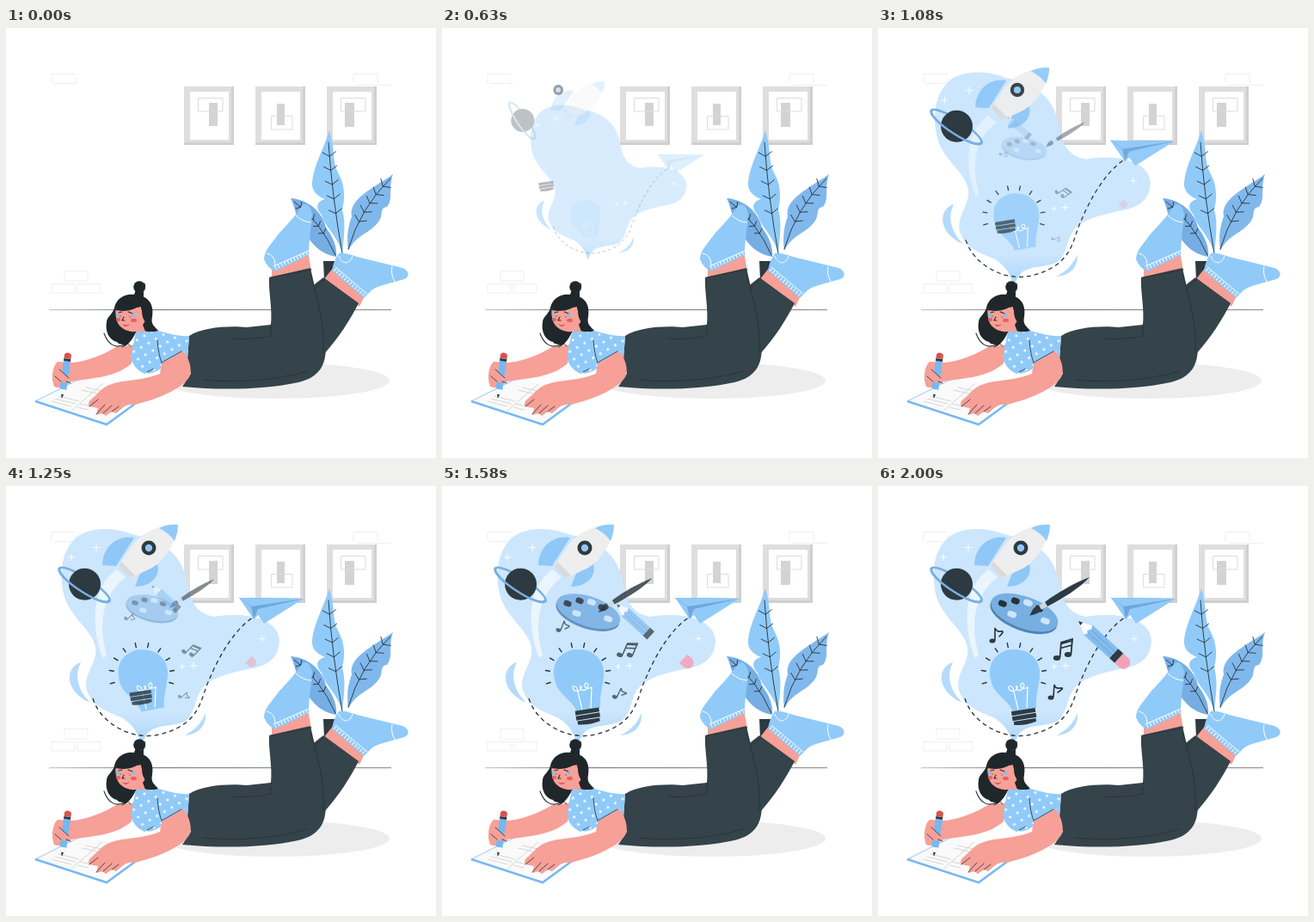
Animation, 500 px wide and 500 px high, one loop 2.04 s. Source, as an HTML page:

```html
<!DOCTYPE html>
<html lang="en">
<head>
<meta charset="utf-8">
<title>Daydreaming</title>
<style>
html, body { margin: 0; width: 100%; height: 100%; overflow: hidden; background: #fff; }
svg { display: block; width: 100vw; height: 100vh; }
.line { fill: none; stroke: #263238; stroke-linecap: round; }
.white { fill: none; stroke: #fff; }
.skin { fill: #f6a097; }
.blue { fill: #90caf9; }
.dark { fill: #2d3a41; }
.pants { fill: #35434a; }
.hair { fill: #20272b; }
</style>
</head>
<body>
<svg viewBox="0 0 500 500">
<defs>
  <pattern id="dots" width="14" height="14" patternUnits="userSpaceOnUse" patternTransform="rotate(15)">
    <path class="blue" d="M0 0H14V14H0z"/>
    <circle cx="3" cy="3" r="1.500" fill="#fff"/><circle cx="10" cy="10" r="1.500" fill="#fff"/>
  </pattern>
  <linearGradient id="air" x1="0" y1="0" x2="0" y2="1">
    <stop offset=".85" stop-color="#cce6fd"/><stop offset="1" stop-color="#aad6fa"/>
  </linearGradient>
  <linearGradient id="floor">
    <stop stop-color="#ccc"/><stop offset=".3" stop-color="#7f8588"/><stop offset="1" stop-color="#999"/>
  </linearGradient>
  <g id="frame">
    <path fill="#dedede" d="M0 0H58V68H0z"/>
    <path fill="#cfcfcf" d="M55 0H58V68H0V65H55z"/>
    <path fill="#fff" d="M7 6H52V62H7z"/>
  </g>
</defs>

<!-- wall and floor -->
<path fill="none" stroke="#efefef" d="M53 64V53.500H81M56 64.500H81V58M404 64V53.500H432V64M407 66.500H448M68 282.500H95V294H68zM53 297.500H80V308H53zM83 297.500H110V308H83z"/>
<path d="M50 327H448V328.200H50z" fill="url(#floor)"/>
<use href="#frame" x="207" y="68"/><use href="#frame" x="290" y="68"/><use href="#frame" x="373" y="68"/>
<path fill="#d3d3d3" d="M236 87H246V114H236zM315 88H324V113H315zM394 87H405V115H394z"/>
<path fill="none" stroke="#dcdcdc" d="M223.500 81.500H252V97H223.500zM308.500 102.500H333V118H308.500zM389.500 81.500H418V97H389.500z"/>
<ellipse cx="313" cy="410" rx="133" ry="21" fill="#ededed"/>

<!-- daydream -->
<g id="cloud">
  <path fill="url(#air)" d="M157 301C154 288 149 279 136 270C118 262 102 258 95 240C87 222 107 206 104 188C101 168 76 154 68 129C60 100 66 72 84 58C104 46 130 49 150 57C182 62 203 80 209 106C213 129 218 148 242 152C270 147 316 150 318 180C317 203 301 210 281 213C259 218 242 222 231 232C218 246 222 262 209 273C194 281 171 276 163 290z"/>
  <path fill="#b5dafb" d="M87 205C68 211 68 239 98 252C84 238 79 221 87 205zM232 264C233 281 222 289 207 290C220 284 227 276 232 264z"/>
  <path class="white" d="M76 79v8m-4-4h8M105 67v9m-4.500-4.500h9M218 205v8m-4-4h8M298 174v7m-3.500-3.500h7M205 207v6m-3-3h6"/>
</g>
<path id="trail" fill="#fff" opacity="0" d="M129 97C104 113 95 155 113 201L117 196C107 160 112 127 139 106z"/>
<path id="route" class="line" stroke-width="1.300" stroke-dasharray="5 4" style="stroke-linecap:butt" d="M101 247C111 279 150 296 178 289C228 277 226 246 236 226C247 199 266 165 290 151"/>
<g id="plane">
  <path class="blue" d="M271 130L346 131L300 160L293 150L288 155z"/>
  <path fill="#6fa6dc" d="M271 130L346 131L293 143L288 155L285 140z"/>
  <path class="blue" d="M271 130L346 131L286 140z"/>
</g>
<g id="rocket">
  <path fill="#8fc7f7" d="M112 92C113 71 128 57 149 60L128 93zM176 91C180 104 169 117 150 117L157 99z"/>
  <path fill="#eee" d="M200 45C177 45 159 54 148 67L131 92L145 107L170 95C186 85 197 68 200 45z"/>
  <path fill="#dadada" d="M134 88L131 93L144 107L150 104z"/>
  <path class="blue" d="M200 45Q188 44 178 49Q190 55 196 64Q200 54 200 45z"/>
</g>
<g id="porthole">
  <circle class="dark" cx="166" cy="72" r="8.500"/><circle cx="166" cy="72" r="4.200" fill="#8fc7f7"/>
</g>
<g id="planet">
  <g fill="none" stroke="#78afe1" stroke-width="2.500" transform="rotate(33 91 115)">
    <ellipse cx="91" cy="115" rx="35" ry="8"/>
    <circle class="dark" cx="91" cy="114" r="18.500" stroke="none"/>
    <path d="M57 113C52 126 130 127 125 113"/>
  </g>
</g>
<g id="bulb">
  <path class="blue" d="M131 225C126 203 141 190 158 190C179 190 190 205 188 222C186 238 183 246 184 258L157 263C152 248 134 243 131 225z"/>
  <path class="white" stroke-width="1.200" d="M163 260L157 235C150 227 150 241 159 238C166 235 158 228 162 237C167 240 173 231 168 229C163 231 167 238 174 234L173 258"/>
</g>
<path id="rays" class="line" stroke-width="1.400"/>
<g id="socket">
  <path class="dark" transform="rotate(-9 170 268)" d="M156 260H184V265H156zM156 266H184V271H156zM157 272H183V276Q170 279 157 276z"/>
</g>
<g id="palette">
  <g transform="rotate(20 170 148)">
    <ellipse cx="170" cy="150" rx="41" ry="18.500" fill="#4e84b9"/>
    <ellipse cx="170" cy="147" rx="41" ry="18.500" fill="#78afe1"/>
    <path class="line" stroke-width="7" d="M141 146h3M154 138h3M183 137h3"/>
    <path class="line" stroke-width="7" style="stroke:#cce6fd" d="M168 135h4M194 148h4M155 154h4"/>
  </g>
</g>
<g id="brush">
  <path class="dark" d="M194 135C210 123 228 113 246 106C234 119 216 130 197 140z"/>
  <path fill="#cfd8dc" d="M187 139L194 135L197 140L190 144z"/>
  <path class="dark" d="M187 139L190 144C186 150 180 149 176 151C179 147 179 141 187 139z"/>
</g>
<g id="pencil">
  <g transform="translate(233 157) rotate(42.500)">
    <path fill="#fff" d="M0 0L17-7.500V7.500z"/><path class="dark" d="M0 0L5-2.200V2.200z"/>
    <path fill="#82bcef" d="M15-7.500H56V7.500H15L18 4L15 1L18-3z"/>
    <path class="line" style="stroke:#5c96cc" stroke-width=".7" d="M18-2.500H56M18 2.500H56"/>
    <path class="dark" d="M56-7.500H64V7.500H56z"/>
  </g>
</g>
<g id="eraser">
  <path fill="#f4a0b8" transform="translate(233 157) rotate(42.500)" d="M64-7.500H72Q79-6 79 0T72 7.500H64z"/>
</g>
<g id="noteA">
  <ellipse class="dark" cx="133" cy="180" rx="3.500" ry="2.600"/>
  <path class="line" stroke-width="1.600" d="M136 179V165Q138 170 143 169T141 175"/>
</g>
<g id="noteB">
  <ellipse class="dark" cx="208" cy="200" rx="4.200" ry="3"/><ellipse class="dark" cx="221" cy="196" rx="4.200" ry="3"/>
  <path class="line" stroke-width="1.800" d="M211.500 199L213 182L226 178L224.500 195M213 183.500L226 180M212.500 188.500L225.500 185"/>
</g>
<g id="noteC">
  <ellipse class="dark" cx="201" cy="246" rx="3.500" ry="2.600"/>
  <path class="line" stroke-width="1.600" d="M204 245L205 231Q206 236 212 235T209 240"/>
</g>

<!-- plant -->
<path fill="#76aee3" d="M331 198C350 199 368 213 372 232C381 244 385 255 384 266C364 263 351 247 346 232C336 221 337 209 331 198z"/>
<path fill="#80b8ec" d="M450 170C444 187 451 198 443 208C434 209 439 217 434 224C424 239 407 240 398 259C396 239 398 231 402 219C398 199 426 187 450 170z"/>
<path class="blue" d="M376 119C383 140 379 156 386 168C395 184 394 199 391 211C396 229 392 248 391 263C386 241 370 231 367 217C360 210 360 202 371 199C361 195 355 189 356 179C358 159 369 142 376 119z"/>
<path id="veins" class="line" stroke-width=".9"/>

<!-- legs -->
<path class="dark" d="M369 271H384L381 283L370 293z"/>
<path class="skin" d="M381 278L418 309L411 324L369 293z"/>
<path class="blue" d="M387 262C396 261 403 265 412 267L461 279C469 282 470 289 463 292C446 297 431 300 425 305L416 314L379 282Q381 270 387 262z"/>
<path class="white" d="M387 265C390 275 400 276 403 265M383 278L420 309M449 277Q447 286 452 295"/>
<path class="white" stroke-width="4" stroke-dasharray="1 3" d="M382 281L417 311"/>
<path class="pants" d="M350 305L369 290L410 320C399 341 389 357 370 379z"/>
<path class="skin" d="M309 278L351 260L355 282L309 291z"/>
<path class="blue" d="M313 283L352 264C352 247 355 233 356 217C355 208 350 203 345 206C335 220 326 230 318 238C310 250 300 258 300 269Q304 279 313 283z"/>
<path class="white" d="M311 277L352 259M303 262Q313 264 313 276M337 218Q346 226 355 226"/>
<path class="white" stroke-width="4" stroke-dasharray="1 3" d="M313 279L352 261"/>
<path class="pants" d="M213 358C228 348 259 346 280 348L308 345C310 326 305 306 306 290L354 279C360 304 365 331 371 360C375 391 365 406 340 412C300 421 246 421 205 417L215 402L211 385z"/>
<path class="line" stroke-width=".8" d="M308 290L355 281M308 345V358Q285 363 262 361M354 286C362 316 371 343 369 378M229 409C268 413 320 409 350 399M358 306Q361 298 371 292"/>

<!-- book -->
<path fill="#fafafa" d="M34 433L84 409L166 420L117 458z"/>
<path fill="none" stroke="#90caf9" d="M34 434L84 409"/>
<path fill="none" stroke="#78b9f2" stroke-width="2.500" d="M34 434L117 461L158 431"/>
<path fill="none" stroke="#ccc" stroke-width=".8" d="M76 445L112 414M61 428l24 6M57 431l24 6M53 434l23 6M86 437l13 3M83 441l13 3M93 418l18 4M88 421l18 4"/>

<!-- arms and body -->
<path class="skin" d="M128 371L151 368L146 390C127 407 99 407 76 411C70 416 61 420 56 417C52 407 54 393 60 388L78 389C97 387 114 379 128 371z"/>
<path fill="url(#dots)" d="M151 353C170 344 190 360 213 358L211 385L212 394L183 391C182 397 172 402 161 402C149 397 144 386 146 377z"/>
<path class="skin" d="M181 389L206 375C214 386 217 398 213 406C202 422 173 432 150 438C139 436 134 443 128 448L123 446L116 451L112 448L105 450L107 442L97 440Q94 435 100 431C107 425 111 419 120 415C138 408 158 411 179 402z"/>
<path fill="url(#dots)" d="M176 361C187 361 199 367 205 376L181 390Q178 376 176 361z"/>
<path class="line" stroke-width=".8" d="M181 389L204 376M176 363Q177 379 181 389M135 370Q141 364 145 370M105 449L115 438M113 448L123 439M97 440L107 432M123 446L131 440M164 400L172 396"/>
<g transform="translate(65 430) rotate(8)">
  <path fill="#76b8f2" d="M-4-10V-44H4V-10L0 0z"/><path fill="#fff" d="M-4-10H4L0 0z"/>
  <path class="dark" d="M-1.500-4H1.500L0 1zM-4-46H4V-43H-4z"/><path fill="#d9534f" d="M-4-46V-51Q0-55 4-51V-46z"/>
</g>
<path class="skin" d="M60 396L73 407Q71 414 65 412L57 408z"/>
<path class="line" stroke-width=".8" d="M62 397L73 407M70 411L75 413M57 405L64 411"/>

<!-- head -->
<circle class="hair" cx="155" cy="301" r="6.800"/>
<path class="hair" d="M149 310L151 304L160 305L160 313zM126 325C129 312 142 307 154 311C168 313 172 324 170 336C168 345 173 347 177 352C168 355 159 352 153 349C149 360 143 369 134 372C143 365 133 371 129 365C120 363 115 353 117 342C117 336 125 332 126 325z"/>
<path class="skin" d="M128 325C137 323 148 327 157 324C163 328 165 339 159 345L162 353L150 353C145 354 134 351 130 343Q126 334 128 325z"/>
<path class="hair" d="M127 328C133 312 147 310 158 319Q150 332 127 328zM155 318C168 319 168 333 163 343Q158 338 158 329z"/>
<path class="line" stroke-width="1.100" d="M131 331l4-1M142 330l5 2M137 336l-2 4l3 0M133 335h.1M144 336h.1M114 355C119 369 128 373 138 368M161 297C163 303 160 307 156 308"/>
<path stroke="#76c3f5" stroke-width="4" stroke-linecap="round" d="M130 334h.1M148 334h.1"/>
<path stroke="#e9605c" stroke-width="4" stroke-linecap="round" d="M130 339h1M147 340h3"/>
<path fill="#c83c46" d="M135 344Q139 347 144 344Q139 350 135 344z"/>
</svg>

<script>
const LOOP = 2040;
const el = id => document.getElementById(id);
const mix = (a, b, f) => a + (b - a) * f;

// A fan of strokes around a point
function fan(x, y, inner, outer, first, last, count) {
  let d = '';
  for (let i = 0; i < count; i++) {
    const a = mix(first, last, i / (count - 1)) * Math.PI / 180;
    d += `M${x + inner * Math.cos(a)} ${y + inner * Math.sin(a)}L${x + outer * Math.cos(a)} ${y + outer * Math.sin(a)}`;
  }
  return d;
}

// A leaf's curved midrib with pairs of side veins
function veins([x0, y0], [cx, cy], [x1, y1], size) {
  let d = `M${x0} ${y0}Q${cx} ${cy} ${x1} ${y1}`;
  for (let f = .35; f < .9; f += .13) {
    const ax = mix(x0, cx, f), ay = mix(y0, cy, f), bx = mix(cx, x1, f), by = mix(cy, y1, f);
    const x = mix(ax, bx, f), y = mix(ay, by, f), dir = Math.atan2(by - ay, bx - ax);
    for (const side of [-1, 1])
      d += `M${x} ${y}l${size * Math.cos(dir + side)} ${size * Math.sin(dir + side)}`;
  }
  return d;
}

el('rays').setAttribute('d', fan(158, 220, 33, 38, 165, 375, 10));
el('veins').setAttribute('d',
  veins([391, 262], [379, 195], [375, 133], 9) +
  veins([398, 257], [412, 209], [447, 175], 9) +
  veins([383, 264], [366, 225], [335, 202], 6));

// Each part grows into place during `time`, starting displaced by `from` and turned by `turn`
const parts = {
  cloud: { time: [250, 1120], pivot: [200, 190], fade: .5 },
  route: { time: [250, 1120], pivot: [200, 190] },
  plane: { time: [250, 1120], pivot: [200, 190] },
  trail: { time: [700, 1200], alpha: .6 },
  rocket: { time: [250, 1150], from: [4, 14] },
  porthole: { time: [250, 1200], from: [-60, 0], fade: 1 },
  planet: { time: [250, 1080], from: [5, -15], turn: 50 },
  bulb: { time: [350, 1300], from: [12, -6] },
  rays: { time: [630, 1150] },
  socket: { time: [250, 1600], from: [-75, -130], fade: 1 },
  palette: { time: [750, 1750], from: [0, -14], turn: -15, fade: 1.5 },
  brush: { time: [650, 1900], from: [12, -8], fade: 1 },
  pencil: { time: [850, 2000], from: [-125, -85], fade: 1 },
  eraser: { time: [850, 1800], fade: 1 },
  noteA: { time: [850, 2000], from: [12, -36], turn: 80, fade: 1 },
  noteB: { time: [700, 2000], turn: 80, fade: 1 },
  noteC: { time: [850, 2000], from: [2, 8], turn: 80, fade: 1 }
};

for (const id in parts) {
  const box = el(id).getBBox();
  parts[id].pivot ??= [box.x + box.width / 2, box.y + box.height / 2];
}

function draw(t) {
  for (const id in parts) {
    const { time: [begin, end], pivot: [x, y], from: [dx, dy] = [0, 0], turn = 0, fade = 2, alpha = 1 } = parts[id];
    const p = Math.min(1, Math.max(0, (t - begin) / (end - begin)));
    const e = 1 - (1 - p) ** 1.3, rest = 1 - e;
    el(id).setAttribute('transform',
      `translate(${x + dx * rest} ${y + dy * rest}) rotate(${turn * rest}) scale(${mix(.4, 1, e)}) translate(${-x} ${-y})`);
    el(id).setAttribute('opacity', alpha * e ** fade);
  }
}

const start = performance.now();
function tick() {
  draw((performance.now() - start) % LOOP);
  requestAnimationFrame(tick);
}
tick();
</script>
</body>
</html>
```
